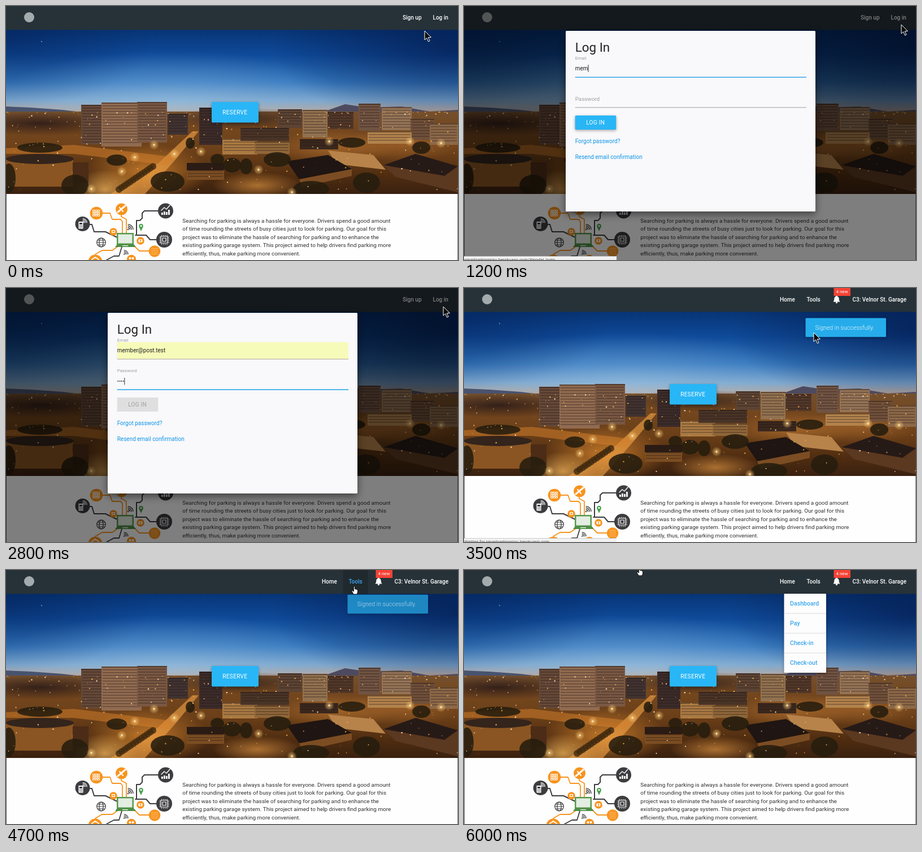
An HTML page with a canvas that plays this animation: 800 px wide and 450 px high, repeating every 6100 ms.

```html
<!DOCTYPE html>
<html lang="en">
<head>
<meta charset="utf-8">
<title>Parking site login</title>
<style>
html, body { margin: 0; width: 100%; height: 100%; overflow: hidden; background: #fff; }
canvas { display: block; width: 100vw; height: 100vh; }
</style>
</head>
<body>
<canvas id="stage" width="800" height="450"></canvas>
<script>
const LOOP = 6100, STEP = 100, TAU = Math.PI * 2;
const BLUE = '#29b6f6', ORANGE = '#f7941e', DARK = '#3d3d40', GREEN = '#43a047', NAV = '#263238';
const stage = document.getElementById('stage').getContext('2d');
let c = stage;

const clamp = v => Math.max(0, Math.min(1, v));
const mix = (a, b, p) => a + (b - a) * p;
const span = (t, start, length) => clamp((t - start) / length);
const outCubic = p => 1 - (1 - p) ** 3;
const outExpo = p => p >= 1 ? 1 : 1 - 2 ** (-10 * p);

function rect(x, y, w, h, color) {
  c.fillStyle = color;
  c.fillRect(x, y, w, h);
}
function disc(x, y, r, color) {
  c.fillStyle = color;
  c.beginPath();
  c.arc(x, y, r, 0, TAU);
  c.fill();
}
function path(points, close) {
  c.beginPath();
  for (let i = 0; i < points.length; i += 2) c.lineTo(points[i], points[i + 1]);
  if (close) c.closePath();
}
function poly(points, color) {
  path(points, true);
  c.fillStyle = color;
  c.fill();
}
function line(points, color, width = 1) {
  path(points);
  c.strokeStyle = color;
  c.lineWidth = width;
  c.lineJoin = c.lineCap = 'round';
  c.stroke();
}
function text(str, x, y, size, color, { weight = 400, align = 'left', spacing = 0 } = {}) {
  c.font = `${weight} ${size}px Roboto, sans-serif`;
  c.letterSpacing = spacing + 'px';
  c.textAlign = align;
  c.fillStyle = color;
  c.fillText(str, x, y);
  const width = c.measureText(str).width;
  c.letterSpacing = '0px';
  return width;
}
function raised(x, y, w, h, color, radius = 1.5, blur = 5, alpha = 0.35) {
  c.save();
  c.shadowColor = `rgba(0,0,0,${alpha})`;
  c.shadowBlur = blur;
  c.shadowOffsetY = blur / 3;
  c.fillStyle = color;
  c.beginPath();
  c.roundRect(x, y, w, h, radius);
  c.fill();
  c.restore();
}
function glow(x, y, rx, ry, rgb, alpha) {
  c.save();
  c.translate(x, y);
  c.scale(1, ry / rx);
  const g = c.createRadialGradient(0, 0, 0, 0, 0, rx);
  g.addColorStop(0, `rgba(${rgb},${alpha})`);
  g.addColorStop(1, `rgba(${rgb},0)`);
  disc(0, 0, rx, g);
  c.restore();
}
function fade(y0, y1, stops) {
  const g = c.createLinearGradient(0, y0, 0, y1);
  stops.forEach(([at, color]) => g.addColorStop(at, color));
  return g;
}
function random(seed) {
  return () => (seed = (seed * 16807) % 2147483647) / 2147483647;
}

// Night skyline in flat shapes and soft gradients
function drawCity() {
  const rnd = random(77);
  c.save();
  c.beginPath();
  c.rect(0, 42, 800, 291);
  c.clip();
  rect(0, 42, 800, 150, fade(42, 192, [[0, '#073476'], [0.3, '#0f4b9a'], [0.62, '#3477be'],
    [0.84, '#7ba5cc'], [0.94, '#a9a5a6'], [1, '#b98a63']]));
  glow(290, 178, 330, 100, '165,205,235', 0.45);
  glow(800, 75, 330, 140, '2,18,62', 0.6);
  glow(0, 60, 260, 120, '2,22,70', 0.4);
  disc(63, 63, 0.8, '#cfe2f5');
  poly([0, 178, 45, 180, 100, 184, 140, 189, 0, 190], '#48536f');
  poly([560, 188, 600, 174, 640, 180, 700, 178, 750, 187, 800, 184, 800, 192, 560, 192], '#4d4a60');

  rect(0, 187, 800, 146, fade(187, 333, [[0, '#74502f'], [0.2, '#74471e'], [0.5, '#6b3f18'], [0.8, '#4d2b10'], [1, '#3a2110']]));
  glow(60, 208, 150, 22, '30,18,22', 0.75);
  glow(420, 200, 130, 20, '35,22,22', 0.6);
  glow(250, 295, 110, 50, '240,150,50', 0.7);
  glow(175, 325, 60, 35, '255,190,95', 0.7);
  glow(445, 318, 80, 24, '240,160,70', 0.6);
  glow(580, 250, 110, 30, '220,140,60', 0.45);
  glow(700, 245, 110, 30, '210,130,55', 0.4);
  poly([330, 222, 341, 222, 300, 272, 246, 333, 185, 333, 270, 278], 'rgba(243,163,70,.6)');
  poly([0, 252, 120, 246, 300, 268, 285, 282, 120, 262, 0, 262], 'rgba(215,130,45,.5)');

  [[133, 175, 44, 70, '#654938'], [169, 171, 71, 78, '#916b50'], [232, 170, 53, 72, '#795843'],
   [342, 180, 41, 66, '#3b2b29'], [286, 191, 36, 37, '#403230'], [383, 235, 62, 28, '#aa7a43'],
   [415, 216, 86, 23, '#493326'], [440, 240, 62, 22, '#8f6639'], [481, 183, 43, 33, '#5c4333'],
   [525, 184, 44, 49, '#91714f'], [569, 188, 46, 30, '#513729'], [624, 173, 39, 48, '#705342'],
   [665, 179, 53, 41, '#957457'], [716, 200, 42, 37, '#70503a'], [750, 208, 50, 38, '#8c6848'],
   [520, 236, 68, 18, '#3a271d'], [640, 222, 78, 22, '#b2834d'], [320, 281, 66, 27, '#7b4d22']
  ].forEach(([x, y, w, h, color]) => {
    rect(x, y, w, h, color);
    rect(x, y, w, 2, 'rgba(30,20,20,.45)');
    for (let row = y + 5; row < y + h - 4; row += 5) rect(x + 2, row, w - 4, 1.6, 'rgba(35,22,20,.38)');
  });

  rect(0, 272, 119, 48, '#8a5522');
  c.fillStyle = '#33241c';
  c.beginPath();
  c.ellipse(60, 271, 60, 9, 0, 0, TAU);
  c.fill();
  rect(118, 277, 28, 36, '#4c2c16');
  poly([570, 256, 650, 264, 672, 290, 585, 280], '#b7834a');
  poly([497, 275, 570, 264, 612, 289, 519, 307], '#1f1512');
  poly([519, 307, 612, 289, 612, 301, 524, 321], '#7c4d23');
  poly([668, 282, 725, 262, 800, 284, 776, 301], '#261a17');
  poly([668, 282, 776, 301, 800, 284, 800, 330, 690, 303], '#5b3820');
  rect(320, 278, 66, 13, '#2a1b14');

  [[374, 272, 12, 10], [400, 282, 16, 13], [425, 284, 11, 14], [196, 273, 18, 10], [60, 251, 40, 9],
   [122, 318, 24, 19], [286, 311, 30, 18], [480, 272, 24, 13], [540, 324, 32, 14], [638, 313, 24, 18],
   [5, 305, 12, 26], [735, 251, 16, 11], [612, 242, 24, 9], [326, 243, 8, 10]
  ].forEach(([x, y, rx, ry]) => {
    c.fillStyle = 'rgba(38,29,14,.88)';
    c.beginPath();
    c.ellipse(x, y, rx, ry, 0, 0, TAU);
    c.fill();
  });
  for (let i = 0; i < 13; i++) disc(200 + i * 5, 325 - i * 3.4, 6, 'rgba(62,40,14,.8)');

  for (let i = 0; i < 260; i++) {
    const x = rnd() * 800, y = 188 + 140 * rnd() ** 2.2, r = 0.4 + rnd() * 0.9;
    disc(x, y, r, rnd() > 0.3 ? 'rgba(255,180,85,.8)' : 'rgba(255,232,185,.9)');
  }
  [[151, 324], [205, 293], [228, 268], [262, 246], [298, 262], [345, 258], [447, 290], [506, 330], [572, 240], [715, 240], [770, 243]]
    .forEach(([x, y]) => { glow(x, y, 9, 9, '255,205,120', 0.75); disc(x, y, 1.4, '#fff0c8'); });
  c.restore();
}

function waves(x, y, angle, color, size = 1) {
  c.strokeStyle = color;
  c.lineWidth = 1.6 * size;
  [3.5, 6.5, 9.5].forEach(r => {
    c.beginPath();
    c.arc(x, y, r * size, angle - 0.75, angle + 0.75);
    c.stroke();
  });
  disc(x, y, 1.3 * size, color);
}

function drawDevices() {
  line([269, 363, 245, 363, 241, 367, 241, 376, 237, 380, 231, 380, 231, 405], DARK, 2);
  line([148, 387, 152, 387, 156, 400, 176, 400, 197, 410], DARK, 2);
  line([267, 414, 255, 414, 248, 406, 229, 406], DARK, 2);
  line([253, 434, 236, 434, 227, 425], ORANGE, 1.8);
  line([171, 367, 184, 367, 188, 378, 203, 378, 206, 382, 206, 403], ORANGE, 1.8);
  line([204, 371, 204, 373, 213, 378, 213, 403], ORANGE, 1.8);
  line([158, 440, 170, 433, 188, 433, 198, 426], ORANGE, 1.8);
  line([178, 450, 191, 443, 200, 443, 205, 427], DARK, 1.8);

  disc(135.5, 386, 13, DARK);
  c.fillStyle = '#fff';
  c.fillRect(128.5, 382, 8, 12.5);
  rect(130, 384, 5, 3, DARK);
  for (let i = 0; i < 6; i++) rect(130 + i % 3 * 2, 388.5 + (i / 3 | 0) * 2.5, 1.2, 1.4, DARK);
  waves(136, 384, -0.8, '#fff', 0.75);

  disc(160, 367, 11.3, ORANGE);
  for (let i = 0; i < 9; i++) {
    c.strokeStyle = '#fff';
    c.lineWidth = 1;
    c.strokeRect(154 + i % 3 * 4.3, 361.5 + (i / 3 | 0) * 4, 3, 2.6);
  }
  disc(204.5, 360, 10.5, ORANGE);
  line([198, 365, 211, 354], '#fff', 3);
  line([201, 357, 207, 364], '#fff', 2);
  disc(282.5, 363, 13.5, DARK);
  [4, 6, 5, 9].forEach((h, i) => rect(275 + i * 4, 370 - h, 2.8, h, '#fff'));
  line([275, 362, 280, 357, 284, 360, 290, 353], '#fff', 1.4);
  disc(280, 414, 14, DARK);
  c.strokeStyle = '#fff';
  c.lineWidth = 1.2;
  c.strokeRect(274, 408, 12, 12);
  c.strokeRect(277, 411, 6, 6);
  for (let i = 0; i < 4; i++) {
    const d = i * 3.2;
    [[275, 406 + d * 0, d, 0], [275, 421.5, d, 0]].forEach(([x, y]) => rect(x + d, y, 1, 1.5, '#fff'));
    rect(271.5, 409 + d, 1.5, 1, '#fff');
    rect(287, 409 + d, 1.5, 1, '#fff');
  }
  disc(263, 434.5, 10.3, ORANGE);
  for (let i = 0; i < 4; i++) rect(257, 429 + i * 3.3, 12, 0.8, '#ffc887');
  disc(190, 400, 6.8, ORANGE);
  rect(187, 397, 6, 5, '#fff');
  rect(188.3, 398.3, 3.4, 2.4, ORANGE);
  disc(238, 416, 6.8, ORANGE);
  rect(234.5, 413.5, 7, 5, '#fff');
  disc(238, 416, 1.4, ORANGE);
  disc(222, 449, 8.2, ORANGE);
  disc(219.5, 447, 2, '#fff');
  disc(224.5, 447, 2, '#fff');
  disc(158, 453, 12.5, ORANGE);
  line([152, 449, 158, 445, 164, 449], '#fff', 2);

  c.strokeStyle = DARK;
  c.lineWidth = 1.2;
  [7.8, 3.6].forEach(rx => {
    c.beginPath();
    c.ellipse(168.5, 419, rx, 7.8, 0, 0, TAU);
    c.stroke();
  });
  line([161, 419, 176, 419], DARK);
  line([162.5, 415, 174.5, 415], DARK);
  line([162.5, 423, 174.5, 423], DARK);

  rect(196, 402, 30, 21, '#58984d');
  rect(198.5, 404.5, 25, 16, '#e3eee2');
  poly([193, 427, 230, 427, 226, 422, 197, 422], '#4d8f45');
  rect(206, 424, 10, 1.2, '#fff');
  poly([235.6, 391.5, 242.4, 391.5, 239, 399], GREEN);
  disc(239, 389.7, 3.8, GREEN);
  disc(239, 389.7, 1.6, '#fff');
  waves(216, 396, -0.8, DARK, 0.95);
  waves(209, 440, -0.8, DARK, 0.75);
}

function drawPage() {
  rect(0, 0, 800, 450, '#fefefe');
  drawCity();
  drawDevices();
  ['Searching for parking is always a hassle for everyone. Drivers spend a good amount',
   'of time rounding the streets of busy cities just to look for parking. Our goal for this',
   'project was to eliminate the hassle of searching for parking and to enhance the',
   'existing parking garage system. This project aimed to help drivers find parking more',
   'efficiently, thus, make parking more convenient.'
  ].forEach((row, i) => text(row, 312.3, 384 + i * 14.45, 9.95, '#303030'));
  rect(0, 333, 1, 117, '#555');
  rect(799, 333, 1, 117, '#777');
  raised(364, 170, 83, 36.5, BLUE);
  text('RESERVE', 383.3, 191.7, 10.1, '#fff', { spacing: 0.3 });
  rect(0, 0, 800, 42.3, NAV);
  disc(41, 20, 9, '#a4abae');
}

function navLink(label, x, hot, align = 'left') {
  const pad = 10;
  if (hot) {
    c.font = '500 10px Roboto, sans-serif';
    rect(x - pad, 0, c.measureText(label).width + 2 * pad, 42.3, '#1f292e');
  }
  text(label, x, 23.8, 10, hot ? '#42a5f5' : '#fff', { weight: 500, align });
}

function drawNav(t) {
  if (t < 3300) {
    navLink('Sign up', 702, false);
    navLink('Log in', 755.5, t >= 400 && t < 600);
    return;
  }
  navLink('Home', 559, false);
  navLink('Tools', 606.5, t >= 4200 && t < 5500);
  navLink('C3: Velnor St. Garage', 783, false, 'right');
  c.fillStyle = '#fff';
  c.beginPath();
  c.moveTo(653.5, 24.5);
  c.quadraticCurveTo(655.3, 23, 655.3, 19);
  c.bezierCurveTo(655.3, 13, 663.7, 13, 663.7, 19);
  c.quadraticCurveTo(663.7, 23, 665.5, 24.5);
  c.fill();
  disc(659.5, 14.4, 1.3, '#fff');
  disc(659.5, 25.7, 1.6, '#fff');
  rect(654.5, 0, 29.5, 14, '#f44336');
  text('4 new', 669, 8.8, 8, '#fff', { align: 'center' });
}

function drawModal(t) {
  const p = outCubic(span(t, 590, 350));
  if (!p || t >= 3300) return;
  rect(0, 0, 800, 450, `rgba(0,0,0,${0.5 * p})`);
  c.save();
  c.globalAlpha = p;
  c.translate(401, mix(18, 44, p));
  c.scale(mix(0.7, 1, p), 1);
  c.translate(-221, 0);
  raised(0, 0, 442, 320, '#f9f8fa', 1.5, 14, 0.5);
  const left = 16.7, width = 409.3;
  text('Log In', left, 37.2, 22.4, '#222');
  text('Email', left, 50.6, 7.95, '#9e9e9e');

  const email = 'member@post.test';
  const typed = t < 1500 ? email.slice(0, Math.max(0, Math.floor((t - 900) / 100))) : email;
  const onEmail = t < 1700;
  if (t >= 1500) rect(left, 52, width, 30, '#f7fbb9');
  const emailWidth = text(typed, left, 70.3, 10, '#222');
  if (onEmail) rect(left + emailWidth, 60, 1, 13, '#333');
  rect(left, 81.5, width, onEmail ? 1.5 : 1, t < 1900 ? '#35a7e8' : '#a8a8a0');

  const lift = outCubic(span(t, 1700, 200));
  text('Password', left, mix(124, 104.8, lift), mix(9.8, 7.95, lift), '#9e9e9e');
  const dots = [2200, 2300, 2500, 2600].filter(at => t >= at).length;
  const dotWidth = text('•'.repeat(dots), left, 124, 9.5, '#222');
  if (!onEmail) rect(left + dotWidth - 0.2, 115, 1, 12.5, '#333');
  rect(left, 135.3, width, onEmail ? 1 : 1.6, onEmail ? '#9e9e9e' : '#29a9ec');

  const sent = t >= 2800;
  if (sent) rect(left, 150, 72.5, 25, '#dfdfdf');
  else raised(left, 150, 72.5, 25, BLUE);
  text('LOG IN', left + 19.5, 166, 10, sent ? '#9f9f9f' : '#fff', { spacing: 0.3 });
  text('Forgot password?', left, 199.3, 10, '#0d96e8');
  text('Resend email confirmation', left, 227.3, 10, '#0d96e8');
  c.restore();
}

function drawToast(t) {
  if (t < 3320) return;
  const enter = outCubic(span(t, 3320, 300)), leave = outExpo(span(t, 4680, 375));
  c.save();
  c.globalAlpha = enter * (1 - leave);
  c.translate(0, 51.7 + 23 * (1 - enter) - 26 * leave);
  raised(604.5, 0, 142.5, 33.5, BLUE);
  text('Signed in successfully.', 621.5, 20.5, 10.6, '#fff', { weight: 300 });
  c.restore();
}

function drawMenu(t) {
  const p = outCubic(span(t, 4790, 300));
  if (!p) return;
  c.save();
  c.globalAlpha = p;
  raised(566.5, 42, 74.5, 140 * p, '#fdfdfd', 1, 5);
  c.beginPath();
  c.rect(566, 42, 76, 140 * p);
  c.clip();
  ['Dashboard', 'Pay', 'Check-in', 'Check-out'].forEach((label, i) => {
    text(label, 577, 63.4 + i * 35, 10.6, '#3aa7ee', { weight: 500 });
    if (i) rect(566.5, 41.5 + i * 35, 74.5, 1, '#dcdcdc');
  });
  c.restore();
}

function drawStatus(t) {
  let note = '';
  if (t >= 500 && t < 1300) note = 'smartparkingsjsu.herokuapp.com/#modal_login';
  if (t >= 3000 && t < 4000) note = 'Waiting for smartparkingsjsu.herokuapp.com...';
  if (!note) return;
  rect(0, 443.5, 270, 7, '#f1f1f1');
  rect(0, 443, 270, 0.7, '#bdbdbd');
  text(note, 0.5, 451.7, 7.5, '#555');
}

const route = [[0, 741, 44], [500, 774, 33], [3200, 774, 33], [3500, 619, 79], [4000, 619, 79],
  [4300, 617, 29], [5350, 617, 29], [5800, 311, -4], [LOOP, 311, -4]];

function drawCursor(t) {
  const i = route.findIndex(stop => stop[0] > t);
  const [t0, x0, y0] = route[i - 1], [t1, x1, y1] = route[i];
  const p = (t - t0) / (t1 - t0), ease = p * p * (3 - 2 * p);
  const hand = t >= 4200 || (t >= 400 && t < 600);
  c.save();
  c.translate(mix(x0, x1, ease), mix(y0, y1, ease));
  c.lineJoin = 'round';
  c.lineWidth = 1;
  if (hand) {
    path([-1.6, 0.8, -0.6, 0, 0.6, 0.8, 0.6, 4.8, 2.8, 5, 4.6, 5.8, 5.6, 7, 5.4, 10.5, 4.2, 14,
      -2, 14, -3.6, 11, -5, 8.2, -4, 7.2, -1.6, 9], true);
    c.fillStyle = '#fff';
    c.strokeStyle = '#111';
  } else {
    path([0, 0, 0, 16, 3.7, 12.6, 6.4, 19, 9, 17.9, 6.3, 11.7, 11.3, 11.4], true);
    c.fillStyle = '#0a0a0a';
    c.strokeStyle = '#fff';
  }
  c.fill();
  c.stroke();
  c.restore();
}

const page = document.createElement('canvas');
page.width = 800;
page.height = 450;
c = page.getContext('2d');
drawPage();
c = stage;

function frame(now) {
  const t = Math.floor((now % LOOP) / STEP) * STEP;
  c.drawImage(page, 0, 0);
  drawNav(t);
  drawToast(t);
  drawMenu(t);
  drawModal(t);
  drawStatus(t);
  drawCursor(t);
  requestAnimationFrame(frame);
}
frame(0);
</script>
</body>
</html>
```
